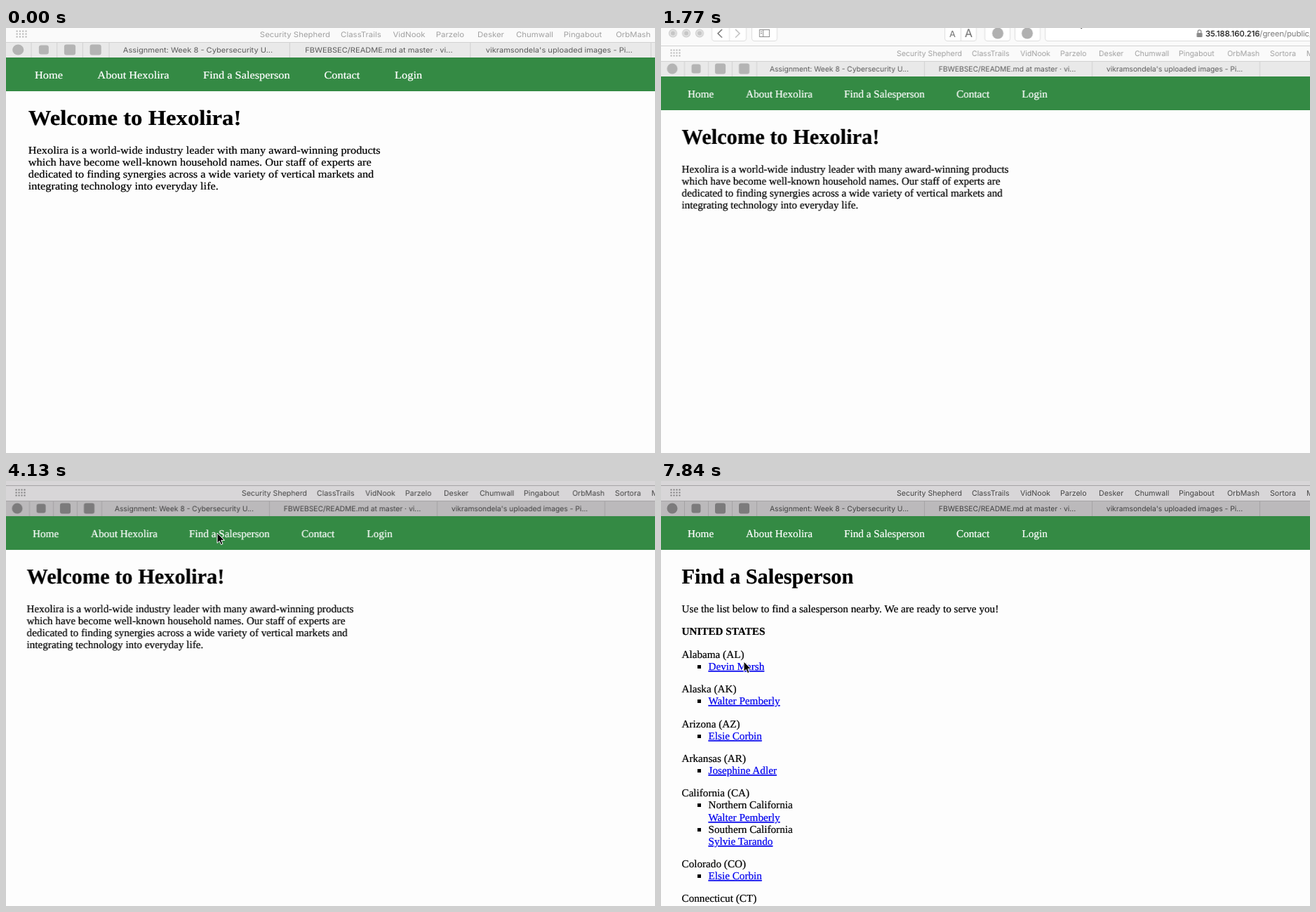
Write an HTML page that moves like this. It is 925 px wide and 605 px high and loops after 7990 ms.

```html
<!DOCTYPE html>
<html lang="en">
<head>
<meta charset="utf-8">
<title>Find a Salesperson</title>
<style>
html, body { margin: 0; width: 100%; height: 100%; overflow: hidden; background: #fdfdfd; }
svg {
  display: block; width: 925px; height: 605px;
  text-rendering: geometricPrecision;
  animation: focus 7990ms -10ms step-end infinite;
}
#cam { animation: cam 7990ms -10ms infinite; }
#cursor { animation: cursor 7990ms -10ms infinite; }
#home { animation: leave 7990ms -10ms step-end infinite; }
#list { animation: enter 7990ms -10ms step-end infinite; }

.ui { font-family: Inter, "Open Sans", sans-serif; }
.page { font: 15.2px "Liberation Serif", "Times New Roman", serif; }
.page text { stroke: #000; stroke-width: .22px; }
.page #nav text { stroke: #fff; }
.page .h1 { font-size: 30.4px; font-weight: bold; }
.page .link { fill: #00e; stroke: #00e; text-decoration: underline; }
.bar { fill: var(--bar); }
.tabs { fill: var(--tabs); }
.line { stroke: var(--line); fill: none; }
.mark { fill: var(--mark); font-size: 10.6px; }
.title { fill: var(--title); font-size: 10.3px; text-anchor: middle; }
.icon { fill: var(--icon); }
.button { fill: #fff; stroke: #dedede; }
.glyph { fill: none; stroke: #8a8a8a; stroke-width: 1.3; }

/* The window gains focus */
@keyframes focus {
  0% { --bar: #fafafa; --tabs: #e9e9e9; --line: #d2d2d2; --mark: #a0a0a0; --title: #5a5a5a; --icon: #b4b4b4; }
  42.593%, 100% { --bar: #d8d6d8; --tabs: #bbb9bb; --line: #a5a3a5; --mark: #444; --title: #404040; --icon: #7c7b7c; }
}
@keyframes leave { 0% { visibility: visible; } 53.704%, 100% { visibility: hidden; } }
@keyframes enter { 0% { visibility: hidden; } 53.704%, 100% { visibility: visible; } }

/* Zoom out, drift left and back, then settle */
@keyframes cam {
  0% { transform: translate(0px, -8px) scale(1.077, 1); animation-timing-function: steps(1); }
  1.852% { transform: translate(0px, 1px) scale(1.055, 1); animation-timing-function: steps(2); }
  5.556% { transform: translate(0px, 17px) scale(1.015, 1); animation-timing-function: steps(2); }
  9.259% { transform: translate(0px, 19px) scale(1, 1); animation-timing-function: steps(3); }
  14.815% { transform: translate(-9.5px, 19px) scale(1, 1); animation-timing-function: steps(4); }
  22.222% { transform: translate(0px, 19px) scale(1, 1); animation-timing-function: steps(4); }
  29.63%, 100% { transform: translate(0px, 0px) scale(1, 1); }
}
@keyframes cursor {
  0% { transform: translate(599px, -40px); animation-timing-function: steps(3); }
  5.556% { transform: translate(599px, -15px); animation-timing-function: steps(5); }
  14.815% { transform: translate(592px, -15px); animation-timing-function: steps(4); }
  22.222% { transform: translate(593px, -15px); animation-timing-function: steps(4); }
  29.63% { transform: translate(297px, 87px); animation-timing-function: steps(1); }
  31.481% { transform: translate(300px, 73px); animation-timing-function: steps(1); }
  37.037% { transform: translate(301px, 74px); animation-timing-function: steps(1); }
  51.852% { transform: translate(300px, 70px); animation-timing-function: steps(2); }
  55.556% { transform: translate(300px, 61px); animation-timing-function: steps(1); }
  62.963% { transform: translate(299px, 37px); animation-timing-function: steps(6); }
  74.074% { transform: translate(127px, 264px); animation-timing-function: steps(1); }
  75.926% { transform: translate(120px, 265px); animation-timing-function: steps(1); }
  81.481% { transform: translate(125px, 266px); animation-timing-function: steps(1); }
  87.037% { transform: translate(126px, 285px); animation-timing-function: steps(1); }
  88.889% { transform: translate(127px, 311px); animation-timing-function: steps(3); }
  94.444% { transform: translate(114px, 257px); animation-timing-function: steps(1); }
  98.148%, 100% { transform: translate(118px, 257px); }
}
</style>
</head>
<body>
<svg viewBox="0 0 925 605">
  <g id="cam">
    <g class="ui">
      <rect class="bar" x="-20" y="-40" width="1000" height="69"/>
      <g fill="#e2e2e2" stroke="#cbcbcb">
        <circle cx="17" cy="-11.5" r="5.5"/><circle cx="36" cy="-11.5" r="5.5"/><circle cx="55" cy="-11.5" r="5.5"/>
      </g>
      <g fill="#c6c6c6">
        <circle cx="17" cy="-11.5" r="3"/><circle cx="36" cy="-11.5" r="3"/><circle cx="55" cy="-11.5" r="3"/>
      </g>
      <g class="button">
        <rect x="72.5" y="-24.5" width="49" height="24" rx="4"/>
        <rect x="129.5" y="-24.5" width="36" height="24" rx="4"/>
        <rect x="404.5" y="-24.5" width="45" height="24" rx="4"/>
        <rect x="461.5" y="-24.5" width="36" height="24" rx="4"/>
        <rect x="504.5" y="-24.5" width="36" height="24" rx="4"/>
        <rect x="547.5" y="-24.5" width="450" height="24" rx="4"/>
        <path d="M97.5-24V-1M427.5-24V-1"/>
      </g>
      <path class="glyph" d="M87-17L81-11.2L87-5.4" style="stroke:#606060"/>
      <path class="glyph" d="M106-17L112-11.2L106-5.4" style="stroke:#b5b5b5"/>
      <path class="glyph" d="M140.5-16.5h14v10h-14zM145.5-16.5v10M142-14h2M142-11.5h2" style="stroke-width:1"/>
      <g fill="#6a6a6a" text-anchor="middle">
        <text x="415.5" y="-6.5" font-size="12.5">A</text>
        <text x="438.5" y="-6" font-size="16">A</text>
      </g>
      <g fill="#b0b0b0"><circle cx="480" cy="-11.5" r="8"/><circle cx="522" cy="-11.5" r="8"/></g>
      <rect x="763.5" y="-12" width="8" height="6" rx="1" fill="#8a8a8a"/>
      <path class="glyph" d="M765.3-12v-2a2.2 2.2 0 0 1 4.4 0v2"/>
      <text x="776" y="-7" font-size="11.2" fill="#111"><tspan font-weight="500">35.188.160.216</tspan><tspan fill="#777">/green/public/index.php</tspan></text>
      <path class="line" d="M-20 6.5H980"/>
      <g id="dots" class="icon"></g>
      <g id="marks"></g>
      <rect class="tabs" x="-20" y="28" width="1000" height="23"/>
      <path class="line" d="M-20 28.5H980M33.5 28V50M67.5 28V50M101.5 28V50M136.5 28V50M375.5 28V50M614.5 28V50M853.5 28V50"/>
      <g class="icon">
        <circle cx="16" cy="39" r="7.5"/>
        <rect x="43.5" y="32.5" width="13" height="13" rx="3"/>
        <rect x="77" y="31.5" width="15" height="15" rx="3"/>
        <rect x="111" y="31.5" width="15" height="15" rx="3"/>
      </g>
      <text class="title" x="254" y="43">Assignment: Week 8 - Cybersecurity U...</text>
      <text class="title" x="493.5" y="43">FBWEBSEC/README.md at master · vi...</text>
      <text class="title" x="732" y="43">vikramsondela's uploaded images - Pi...</text>
    </g>
    <g class="page">
      <rect x="-20" y="50" width="1000" height="48" fill="#348a44"/>
      <g id="nav" fill="#fff"></g>
      <g id="home">
        <text class="h1" x="29.5" y="146">Welcome to Hexolira!</text>
      </g>
      <g id="list">
        <text class="h1" x="29.5" y="146">Find a Salesperson</text>
        <text x="29.5" y="187">Use the list below to find a salesperson nearby. We are ready to serve you!</text>
        <text x="29.5" y="219" font-weight="bold">UNITED STATES</text>
      </g>
    </g>
  </g>
  <path id="cursor" d="M0 0V14.4L3.3 11.4L5.5 16.6L8 15.5L5.8 10.4H10.4Z" fill="#000" stroke="#fff" stroke-width="1"/>
</svg>
<script>
const add = (id, name, attrs, text = '') => {
  const el = document.createElementNS('http://www.w3.org/2000/svg', name);
  for (const key in attrs) el.setAttribute(key, attrs[key]);
  el.textContent = text;
  document.getElementById(id).append(el);
};
const write = (id, x, y, text, cls = '') => add(id, 'text', { x, y: Math.round(y), class: cls }, text);

for (let i = 0; i < 12; i++)
  add('dots', 'rect', { x: 13.5 + i % 4 * 4, y: 11.5 + Math.floor(i / 4) * 4, width: 2, height: 2, rx: .5 });

[[336, 'Security Shepherd'], [443, 'ClassTrails'], [512, 'VidNook'], [569, 'Parzelo'], [624, 'Desker'],
 [675, 'Chumwall'], [738, 'Pingabout'], [807, 'OrbMash'], [868, 'Sortora'], [920, 'MAPS']]
  .forEach(([x, text]) => write('marks', x, 21, text, 'mark'));

[[38, 'Home'], [121, 'About Hexolira'], [261, 'Find a Salesperson'], [421, 'Contact'], [514.5, 'Login']]
  .forEach(([x, text]) => write('nav', x, 80, text));

['Hexolira is a world-wide industry leader with many award-winning products',
 'which have become well-known household names. Our staff of experts are',
 'dedicated to finding synergies across a wide variety of vertical markets and',
 'integrating technology into everyday life.']
  .forEach((text, i) => write('home', 29.5, 187 + i * 17.1, text));

// Each state: name, then entries; "-" marks a bullet, "@" a link
const states = [
  ['Alabama (AL)', '-@Devin Marsh'],
  ['Alaska (AK)', '-@Walter Pemberly'],
  ['Arizona (AZ)', '-@Elsie Corbin'],
  ['Arkansas (AR)', '-@Josephine Adler'],
  ['California (CA)', '-Northern California', '@Walter Pemberly', '-Southern California', '@Sylvie Tarando'],
  ['Colorado (CO)', '-@Elsie Corbin'],
  ['Connecticut (CT)']
];
let y = 251.7;
for (const [state, ...entries] of states) {
  write('list', 29.5, y, state);
  for (const entry of entries) {
    y += 17.1;
    if (entry[0] === '-') add('list', 'rect', { x: 52, y: Math.round(y) - 7, width: 5, height: 5 });
    write('list', 67.5, y, entry.replace(/[-@]/g, ''), entry.includes('@') ? 'link' : '');
  }
  y += 32.3;
}
</script>
</body>
</html>
```
